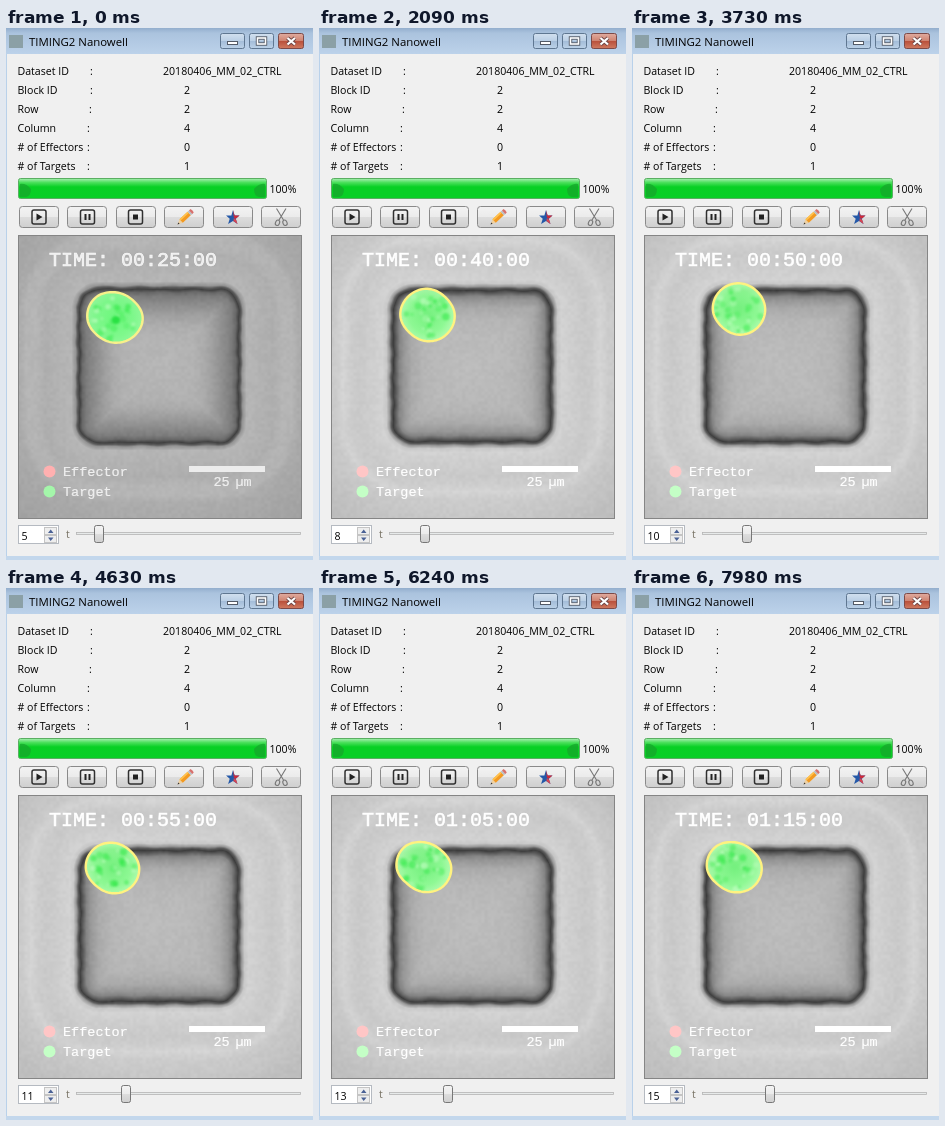
An HTML page with a canvas for the animation above (8000 ms loop, 307 by 532 pixels).

```html
<!DOCTYPE html>
<html lang="en">
<head>
<meta charset="utf-8">
<title>TIMING2 Nanowell</title>
<style>
html, body { margin: 0; width: 100%; height: 100%; overflow: hidden; background: #f0f0f0; }
canvas, svg { position: absolute; display: block; }
canvas { left: 13px; top: 208px; }
svg { left: 0; top: 0; }
text { font: 10.6px "Open Sans", "Noto Sans", sans-serif; fill: #000; white-space: pre; }
.title { font-size: 11.4px; }
.mono text { font: 13.5px "Liberation Mono", monospace; fill: inherit; stroke: #fff; stroke-width: .2; }
.mono .clock { font-size: 20px; stroke-width: .6; }
</style>
</head>
<body>
<canvas id="well" width="283" height="283"></canvas>
<svg width="307" height="532" viewBox="0 0 307 532">
  <defs>
    <linearGradient id="bar" x2="0" y2="1">
      <stop stop-color="#93aecd"/><stop offset=".2" stop-color="#abc3de"/><stop offset="1" stop-color="#bcd2ea"/>
    </linearGradient>
    <linearGradient id="btn" x2="0" y2="1">
      <stop stop-color="#f3f3f3"/><stop offset=".5" stop-color="#ebebeb"/><stop offset=".5" stop-color="#dddddd"/><stop offset="1" stop-color="#cfcfcf"/>
    </linearGradient>
    <linearGradient id="cap" x2="0" y2="1">
      <stop stop-color="#d2e0ef"/><stop offset=".5" stop-color="#bacfe5"/><stop offset=".5" stop-color="#a3bcd8"/><stop offset="1" stop-color="#bcd2e8"/>
    </linearGradient>
    <linearGradient id="shut" x2="0" y2="1">
      <stop stop-color="#e0aca0"/><stop offset=".5" stop-color="#cf8370"/><stop offset=".5" stop-color="#b94f3a"/><stop offset="1" stop-color="#cf7a60"/>
    </linearGradient>
    <linearGradient id="fill" x2="0" y2="1">
      <stop stop-color="#a9eeb2"/><stop offset=".2" stop-color="#4be05c"/><stop offset=".42" stop-color="#08d024"/><stop offset="1" stop-color="#08cf26"/>
    </linearGradient>
  </defs>

  <rect width="307" height="26" fill="url(#bar)"/>
  <path d="M.5 26V532" stroke="#b9d1ea"/>
  <rect y="528" width="307" height="4" fill="#c3d7ec"/>
  <rect x="3" y="7" width="14" height="13" fill="#8ba0a6"/>
  <text class="title" x="23" y="18">TIMING2 Nanowell</text>
  <g stroke="#5f7791">
    <rect x="214.5" y="5.5" width="24" height="15" rx="2" fill="url(#cap)"/>
    <rect x="243.5" y="5.5" width="24" height="15" rx="2" fill="url(#cap)"/>
    <rect x="272.5" y="5.5" width="25" height="15" rx="2" fill="url(#shut)" stroke="#7c4a48"/>
  </g>
  <rect x="221.5" y="13.5" width="10" height="3" fill="#fff" stroke="#535a66"/>
  <rect x="251.5" y="10" width="8" height="6" fill="none" stroke="#535a66" stroke-width="3.4"/>
  <rect x="251.5" y="10" width="8" height="6" fill="none" stroke="#fff" stroke-width="1.6"/>
  <path d="M281.5 10L289 16.5M289 10L281.5 16.5" stroke="#6a4444" stroke-width="3.8"/>
  <path d="M281.5 10L289 16.5M289 10L281.5 16.5" stroke="#fff" stroke-width="2.2"/>

  <g id="rows"></g>

  <rect x="12.5" y="150.5" width="248" height="20" rx="2" fill="url(#fill)" stroke="#5aae62"/>
  <path d="M14 156Q20 155 25 161Q25 168 20 169H14ZM259 156Q253 155 248 161Q248 168 253 169H259Z" fill="#16a62b" opacity=".75"/>
  <text x="263.5" y="165">100%</text>

  <g id="buttons" fill="url(#btn)" stroke="#8a8a8a"></g>
  <g id="frames" fill="none" stroke="#303030" stroke-width="1.5"></g>
  <path d="M30.5 185.5V192.5L36.5 189ZM78.5 186H80.5V192H78.5ZM82.5 186H84.5V192H82.5ZM127 186.5H132V191.5H127Z" fill="#222"/>
  <g transform="translate(171.5 196.5) rotate(-43)">
    <path d="M0 0L5-2.4V2.4Z" fill="#efd0a0"/><path d="M0 0L2-1V1Z" fill="#333"/>
    <path d="M5-2.4H16V2.4H5Z" fill="#f39a22"/><path d="M5-2.4H16V-.7H5Z" fill="#ffc24d"/>
    <path d="M16-2.4H18V2.4H16Z" fill="#b9bec4"/><path d="M18-2.4H20Q21 0 20 2.4H18Z" fill="#d8706c"/>
  </g>
  <g transform="translate(227 189.5) scale(.82) translate(-227 -189.5)">
    <path d="M227 180.5L229 187L235 187L230.3 191L232.5 197.5L227 193.7L221 197.5L223 191L218.5 187L225 187Z" fill="#2458a8"/>
    <path d="M227 180.5L229 187H235L230.3 191L228 189.5Z" fill="#cf2938"/>
    <path d="M228 190L231 192.5L232.5 197.5L227.5 193.7Z" fill="#d94450"/>
  </g>
  <g fill="none" stroke="#777" stroke-width="1.1">
    <path d="M270.5 180.5L277.5 192M280 180.5L273 192"/>
    <ellipse cx="271.5" cy="194.8" rx="2" ry="2.8" transform="rotate(25 271.5 194.8)"/>
    <ellipse cx="279" cy="194.8" rx="2" ry="2.8" transform="rotate(-25 279 194.8)"/>
  </g>

  <rect x="12.5" y="207.5" width="283" height="283" fill="none" stroke="#858585"/>
  <g class="mono" id="marks" fill="#fff">
    <text class="clock" id="clock" x="43" y="238"></text>
    <circle id="red" cx="43.5" cy="443.5" r="6"/>
    <circle id="green" cx="43.5" cy="463.5" r="6"/>
    <text x="57" y="448">Effector</text>
    <text x="57" y="468">Target</text>
    <rect x="183" y="438" width="76" height="6"/>
    <text x="207.5" y="458">25<tspan x="229.5">µm</tspan></text>
  </g>

  <rect x="12.5" y="497.5" width="40" height="18" fill="#fff" stroke="#b5bac1"/>
  <rect x="38.5" y="499.5" width="12" height="7" fill="#eee" stroke="#c4c4c4"/>
  <rect x="38.5" y="507.5" width="12" height="7" fill="#eee" stroke="#c4c4c4"/>
  <path d="M42 505L44.7 501.5L47.5 505ZM42 509.5L44.7 513L47.5 509.5Z" fill="#4a6195"/>
  <text id="spin" x="15.5" y="512"></text>
  <text x="60" y="510" style="fill:#777264">t</text>
  <rect x="70.5" y="504.5" width="224" height="2" fill="#e7eaea" stroke="#b5b5b5" stroke-width=".8"/>
  <rect id="thumb" y="497.5" width="9" height="17" rx="2" fill="url(#btn)" stroke="#777"/>
  <path id="mouse" transform="translate(296 431)" d="M.5.5V16L4 12.5L6.5 18.5L9 17.5L6.5 12H11.5Z" fill="#fff" stroke="#000"/>
</svg>
<script>
const $ = id => document.getElementById(id);
const LOOP = 8000, FIRST = 5;
const starts = [0, 600, 1370, 2090, 2990, 3730, 4630, 5400, 6240, 6990, 7850];
const mouseOn = [7700, 7980];

// step, centre x, centre y, then eight radii clockwise from the right
const outlines = [
  [5, 109, 290, 28.5, 27, 25.5, 25.5, 28.5, 29, 26.5, 26],
  [6, 110, 290, 29.5, 26.5, 26, 26, 29, 28, 27, 26],
  [8, 108.5, 287, 28, 28, 27, 26, 28, 27.5, 27, 26],
  [10, 107, 281, 27, 27, 26.5, 25.5, 27, 27, 26.5, 26],
  [12, 106, 279, 28, 28, 25.5, 24.5, 28, 28, 25.5, 25],
  [14, 104, 279, 28, 28, 26, 24.5, 28.5, 29.5, 25.5, 24.5],
  [15, 102.5, 279, 28, 28, 26, 25, 28.5, 28.5, 25.5, 25]
];
// grey level against distance from the wall, negative inside
const sharp = [[-75, 188], [-45, 185], [-30, 181], [-18, 170], [-10, 150], [-6, 132], [-3, 98], [0, 62], [2, 92],
  [4, 152], [7, 200], [11, 210], [20, 206], [34, 201], [42, 204], [50, 212], [58, 204], [90, 199]];
const soft = [[-75, 182], [-45, 178], [-34, 170], [-24, 156], [-14, 138], [-7, 124], [-3, 104], [0, 66], [2, 92],
  [4, 148], [8, 181], [14, 180], [34, 174], [44, 181], [53, 181], [60, 173], [90, 172]];

const mix = (a, b, k) => a + (b - a) * k;
const ease = k => k * k * (3 - 2 * k);

function random(seed) {
  return () => {
    seed = (seed * 1664525 + 1013904223) >>> 0;
    return seed / 4294967296;
  };
}

function ramp(stops, d) {
  let i = 1;
  while (i < stops.length - 1 && d > stops[i][0]) i++;
  const [a, u] = stops[i - 1], [b, v] = stops[i];
  return mix(u, v, Math.max(0, Math.min(1, (d - a) / (b - a))));
}

function wallDistance(x, y, grow) {
  const r = 19;
  const qx = Math.abs(x - 153) - 78.5 - grow + r;
  const qy = Math.abs(y - 338) - 75.5 - grow + r;
  const d = Math.hypot(Math.max(qx, 0), Math.max(qy, 0)) + Math.min(Math.max(qx, qy), 0) - r;
  const near = Math.exp(-d * d / 60);
  return d + near * (.4 * Math.sin(x * .21 + y * .13) + .35 * Math.sin(y * .37 - x * .16));
}

function grain(seed) {
  const next = random(seed * 977), size = 96;
  const cells = Float32Array.from({ length: size * size }, () => next() - .5);
  return (x, y) => {
    const u = x / 3.2, v = y / 3.2, i = Math.floor(u), j = Math.floor(v);
    const at = (a, b) => cells[(j + b) * size + i + a];
    const k = ease(u - i);
    return mix(mix(at(0, 0), at(1, 0), k), mix(at(0, 1), at(1, 1), k), ease(v - j));
  };
}

function outlineAt(step) {
  const n = outlines.findIndex(o => o[0] >= step);
  const b = outlines[n], a = outlines[Math.max(0, n - 1)];
  const k = a === b ? 0 : (step - a[0]) / (b[0] - a[0]);
  return b.slice(1).map((v, i) => mix(a[i + 1], v, k));
}

// smooth closed curve through the radii, s in 0..8
function radiusAt(radii, s) {
  const n = Math.floor(s), k = s - n;
  const [a, b, c, d] = [-1, 0, 1, 2].map(o => radii[(n + o + 8) % 8]);
  return b + k / 2 * (c - a + k * (2 * a - 5 * b + 4 * c - d + k * (3 * (b - c) + d - a)));
}

function drawCell(c, step) {
  const [cx, cy, ...radii] = outlineAt(step);
  const next = random(step * 131 + 7);
  const path = new Path2D();
  for (let s = 0; s < 8; s += 1 / 12) {
    const a = s * Math.PI / 4, r = radiusAt(radii, s) - .8;
    path.lineTo(cx + r * Math.cos(a), cy + r * Math.sin(a));
  }
  path.closePath();
  const dim = step === FIRST;
  const g = c.createRadialGradient(cx, cy, 2, cx, cy, 29);
  g.addColorStop(0, dim ? "#6cfc7c" : "#74f47e");
  g.addColorStop(.6, dim ? "#7cfc8a" : "#8cfc92");
  g.addColorStop(1, dim ? "#92fc9c" : "#b6ffb4");
  c.save();
  c.clip(path);
  c.globalAlpha = .95;
  c.fillStyle = g;
  c.fillRect(cx - 40, cy - 40, 80, 80);
  c.filter = "blur(1.2px)";
  for (let i = 0; i < 30; i++) {
    const a = next() * 2 * Math.PI, r = 23 * Math.sqrt(next());
    c.globalAlpha = .25 + .35 * next();
    c.fillStyle = i % 3 ? "#34e84a" : "#c6ffc6";
    c.beginPath();
    c.arc(cx + r * Math.cos(a), cy + r * Math.sin(a), 1.5 + 2.2 * next(), 0, 7);
    c.fill();
  }
  if (dim) {
    c.globalAlpha = .8;
    c.fillStyle = "#1cdc38";
    c.beginPath();
    c.arc(110, 292, 4, 0, 7);
    c.fill();
  }
  c.restore();
  c.lineWidth = 2.4;
  c.strokeStyle = dim ? "#f8f08a" : "#fff280";
  c.stroke(path);
}

function paintWell(step) {
  const canvas = document.createElement("canvas");
  const size = canvas.width = canvas.height = 283;
  const c = canvas.getContext("2d");
  const img = c.createImageData(size, size);
  const noise = grain(step), dim = step === FIRST;
  for (let j = 0, p = 0; j < size; j++) {
    for (let i = 0; i < size; i++, p += 4) {
      const x = i + 13.5, y = j + 208.5;
      const edge = Math.max(0, Math.hypot(x - 153, y - 338) - 135);
      const level = ramp(dim ? soft : sharp, wallDistance(x, y, dim ? 1 : 0)) - edge * .14 + noise(i, j) * 7;
      img.data.fill(level, p, p + 3);
      img.data[p + 3] = 255;
    }
  }
  c.putImageData(img, 0, 0);
  c.translate(-13, -208);
  drawCell(c, step);
  return canvas;
}

const info = [
  ["Dataset ID", 84, "20180406_MM_02_CTRL", 157], ["Block ID", 84, "2", 178], ["Row", 83, "2", 178],
  ["Column", 81, "4", 178], ["# of Effectors", 81, "0", 178], ["# of Targets", 81, "1", 178]
];
$("rows").innerHTML = info.map(([label, colon, value, x], i) => {
  const cell = (at, s) => `<text x="${at}" y="${47 + 19 * i}">${s}</text>`;
  return cell(11.5, label) + cell(colon, ":") + cell(x, value);
}).join("");
$("buttons").innerHTML = [0, 1, 2, 3, 4, 5].map(i =>
  `<rect x="${Math.round(13 + 48.4 * i) + .5}" y="178.5" width="39" height="21" rx="3"/>`).join("");
$("frames").innerHTML = [26, 74.5, 122.5].map(x =>
  `<rect x="${x}" y="182" width="14" height="14" rx="2"/>`).join("");

const pictures = starts.map((_, i) => paintWell(FIRST + i));
const screen = $("well").getContext("2d");
let shown = -1;

function show(i) {
  const step = FIRST + i, minutes = step * 5;
  const two = n => String(n).padStart(2, "0");
  screen.drawImage(pictures[i], 0, 0);
  $("clock").textContent = `TIME: ${two(Math.floor(minutes / 60))}:${two(minutes % 60)}:00`;
  $("spin").textContent = step;
  $("thumb").setAttribute("x", Math.round(88 + 4.48 * i) + .5);
  $("marks").setAttribute("fill", i ? "#fff" : "#ececec");
  $("red").setAttribute("fill", i ? "#ffc6c6" : "#ffb0b0");
  $("green").setAttribute("fill", i ? "#c4ffc6" : "#a4f6aa");
}

const begin = performance.now();
function tick() {
  const t = (performance.now() - begin) % LOOP;
  const i = starts.filter(s => s <= t).length - 1;
  if (i !== shown) show(shown = i);
  $("mouse").style.display = t >= mouseOn[0] && t < mouseOn[1] ? "" : "none";
  requestAnimationFrame(tick);
}
tick();
</script>
</body>
</html>
```
